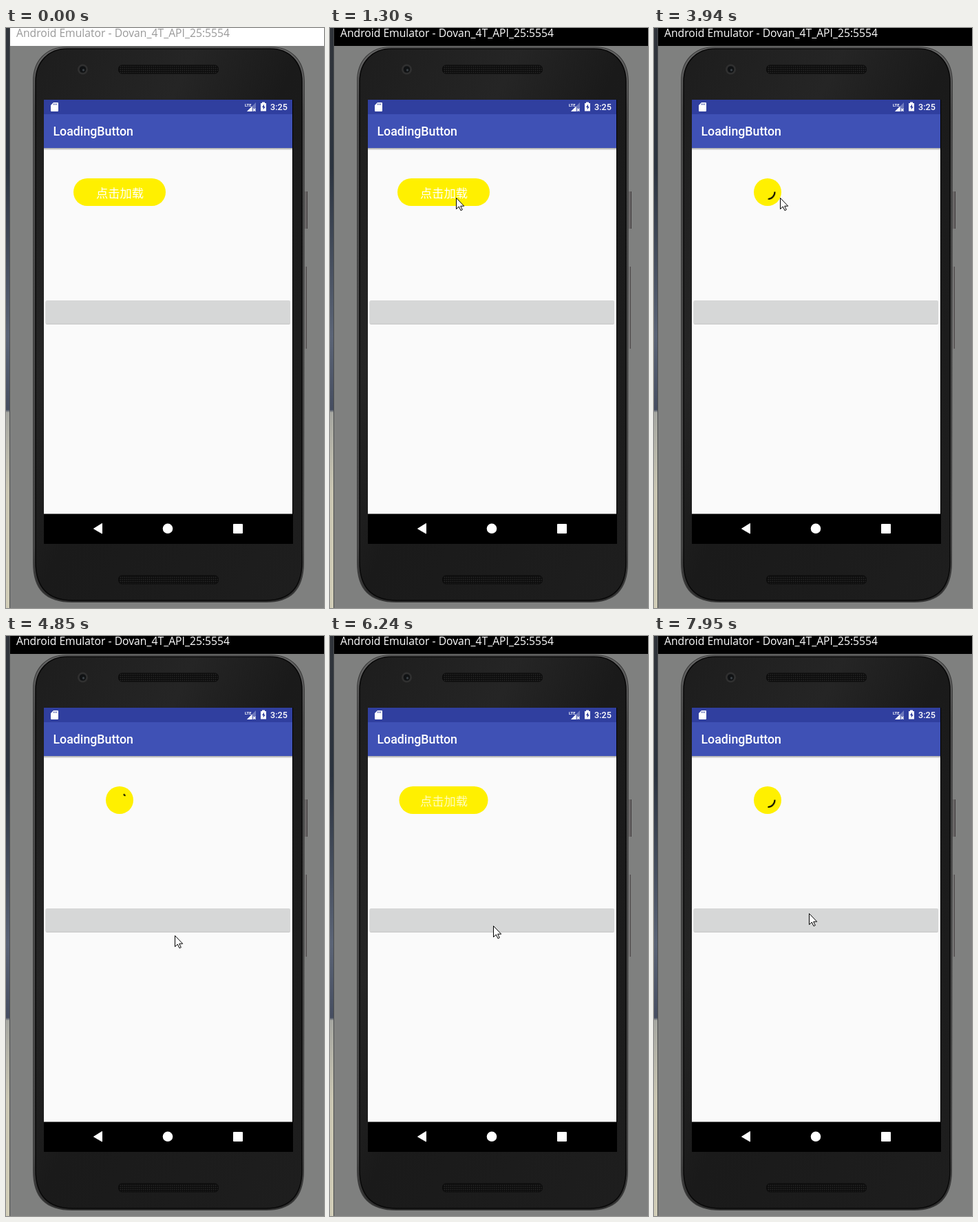
These frames come from a looping animation (462 by 841 pixels, 8 s). An HTML page:

```html
<!DOCTYPE html>
<html lang="en">
<head>
<meta charset="utf-8">
<title>Loading button</title>
<style>
@property --head { syntax: "<number>"; inherits: false; initial-value: 0; }
@property --tail { syntax: "<number>"; inherits: false; initial-value: 0; }

html, body { margin: 0; width: 100%; height: 100%; overflow: hidden; background: #7f807f; }
svg { display: block; width: 100%; height: 100%; }
.roboto { font-family: Roboto, sans-serif; font-weight: 500; fill: #fff; }

.titlebar, .caption, .pill, .label, .arc, .cursor, .pressed, .ripple {
  animation-duration: 8s;
  animation-iteration-count: infinite;
  animation-timing-function: linear;
}

.titlebar { animation-name: bar; animation-timing-function: step-end; }
@keyframes bar { 0% { fill: #fff; } 14.375%, 100% { fill: #000; } }

.caption { font: 15.7px "Open Sans", sans-serif; animation-name: caption; animation-timing-function: step-end; }
@keyframes caption { 0% { fill: #999; } 14.375%, 100% { fill: #fff; } }

.pill { animation-name: pill; animation-timing-function: cubic-bezier(.37, 0, .63, 1); }
@keyframes pill {
  0%, 17.5%, 79.5%, 89.125% { x: 98px; width: 134px; }
  27.5%, 69.5%, 99.125%, 100% { x: 145px; width: 40px; }
}

.label { font: 17.25px "Noto Sans CJK SC", "Noto Sans CJK", sans-serif; fill: #fff; animation-name: label; }
@keyframes label {
  0%, 17.5%, 79.5%, 89.125% { opacity: 1; }
  23.5%, 73.5%, 95.125%, 100% { opacity: 0; }
}

/* The head eases round evenly; the tail waits, then catches up. */
.arc {
  fill: none; stroke: #000; stroke-width: 2;
  stroke-dasharray: calc((var(--head) - var(--tail)) * 1px) 720px;
  transform: rotate(calc(var(--tail) * 1deg));
  transform-origin: 165.5px 238px;
  animation-name: arc, head, tail;
  animation-duration: 8s, 2s, 2s;
  animation-delay: 0s, -.72s, -.72s;
  animation-timing-function: step-end, cubic-bezier(.37, 0, .63, 1), linear;
}
@keyframes arc {
  0% { opacity: 0; } 22% { opacity: 1; }
  73% { opacity: 0; } 93.5%, 100% { opacity: 1; }
}
@keyframes head { from { --head: 0; } to { --head: 360; } }
@keyframes tail {
  0% { --tail: -16; }
  40% { --tail: 0; animation-timing-function: ease-in-out; }
  90% { --tail: 338; }
  100% { --tail: 344; }
}

.pressed { animation-name: pressed; }
@keyframes pressed {
  0%, 67.5% { opacity: 0; }
  70%, 73.5% { opacity: 1; }
  78%, 100% { opacity: 0; }
}
.ripple { animation-name: ripple; }
@keyframes ripple {
  0%, 67.5% { r: 10px; opacity: 0; }
  69% { r: 34px; opacity: .8; }
  71.125% { r: 59px; opacity: 1; }
  76%, 100% { r: 182px; opacity: 0; }
}

.cursor { animation-name: cursor; }
@keyframes cursor {
  0% { transform: translate(-60px, -60px); animation-timing-function: step-end; }
  .875% { transform: translate(367px, 771px); animation-timing-function: step-end; }
  1.75% { transform: translate(255px, 520px); animation-timing-function: step-end; }
  2.625% { transform: translate(147px, 283px); animation-timing-function: step-end; }
  5.625% { transform: translate(158px, 264px); animation-timing-function: step-end; }
  6.625%, 9.625% { transform: translate(170px, 247px); }
  11.625%, 53.75% { transform: translate(183px, 246px); }
  57.75% { transform: translate(247px, 439px); }
  60.625% { transform: translate(245px, 434px); }
  63.5%, 83% { transform: translate(237px, 420px); }
  87.75%, 92.5% { transform: translate(157px, 238px); }
  97.5%, 100% { transform: translate(225px, 402px); }
}
</style>
</head>
<body>
<svg viewBox="0 0 462 841" preserveAspectRatio="none">
  <defs>
    <linearGradient id="desk" x2="0" y2="1">
      <stop offset="0" stop-color="#30343a"/>
      <stop offset=".24" stop-color="#2b333f"/>
      <stop offset=".53" stop-color="#5b6476"/>
      <stop offset=".658" stop-color="#454d60"/>
      <stop offset=".663" stop-color="#a6a7a1"/>
      <stop offset=".8" stop-color="#cbc7b3"/>
      <stop offset="1" stop-color="#d2ceb8"/>
    </linearGradient>
    <linearGradient id="body" x2="1" y2="1">
      <stop offset="0" stop-color="#1d1d1d"/>
      <stop offset=".3" stop-color="#252525"/>
      <stop offset=".5" stop-color="#1a1a1a"/>
      <stop offset="1" stop-color="#1e1e1e"/>
    </linearGradient>
    <linearGradient id="rim" x2="0" y2="1">
      <stop offset="0" stop-color="#666"/>
      <stop offset=".12" stop-color="#4c4c4c"/>
      <stop offset=".9" stop-color="#484848"/>
      <stop offset="1" stop-color="#2a2a2a"/>
    </linearGradient>
    <linearGradient id="shade" x2="0" y2="1">
      <stop offset="0" stop-opacity=".34"/>
      <stop offset="1" stop-opacity="0"/>
    </linearGradient>
    <pattern id="mesh" width="3" height="3" patternUnits="userSpaceOnUse">
      <rect width="3" height="3" fill="#0e0e0e"/>
      <circle cx="1.5" cy="1.5" r=".8" fill="#2b2b2b"/>
    </pattern>
    <clipPath id="wide"><rect x="57.5" y="395" width="355.5" height="34" rx="2"/></clipPath>
  </defs>

  <rect width="462" height="841" fill="#7f807f"/>
  <rect width="5" height="841" fill="url(#desk)"/>
  <rect x="5" width="1" height="841" fill="#4a4c4d"/>
  <rect class="titlebar" x="6" width="456" height="26"/>
  <text class="caption" x="15" y="13">Android Emulator - Dovan_4T_API_25:5554</text>

  <!-- phone -->
  <rect x="434" y="237" width="3" height="54" fill="#6a6767"/>
  <rect x="437" y="237" width="1" height="54" fill="#3f3b3b"/>
  <rect x="434" y="346" width="2" height="119" fill="#777676"/>
  <rect x="436" y="346" width="1" height="119" fill="#4b4747"/>
  <path d="M88 27H385C415 27 434 47 434 77L433 775C433 816 413 833 378 833H96C58 833 39 815 39 775V77C39 47 58 27 88 27Z" fill="#3c3c3c"/>
  <path d="M88 28H385C414 28 433 48 433 77L432 775C432 815 412 832 378 832H96C59 832 40 814 40 775V77C40 48 59 28 88 28Z" fill="url(#rim)"/>
  <path d="M89 30H384C411 30 430 49 430 78V774C430 813 410 830 377 830H97C62 830 43 812 43 774V78C43 49 62 30 89 30Z" fill="url(#body)" stroke="#080808" stroke-width="1.5"/>
  <circle cx="111.5" cy="60" r="7.5" fill="#303030"/>
  <circle cx="111.5" cy="60" r="4.8" fill="#101214"/>
  <circle cx="112.5" cy="61" r="1.7" fill="#3b4146"/>
  <rect x="163.5" y="54" width="145" height="12" rx="5" fill="url(#mesh)" stroke="#0b0b0b"/>
  <rect x="163.5" y="794" width="145" height="12" rx="5" fill="url(#mesh)" stroke="#0b0b0b"/>

  <!-- screen -->
  <rect x="55" y="104" width="362" height="644"/>
  <rect x="55" y="174" width="361" height="530.500" fill="#fafafa"/>
  <rect x="55" y="174" width="361" height="3.500" fill="url(#shade)"/>
  <rect x="55" y="104" width="361" height="21" fill="#303f9f"/>
  <rect x="55" y="125" width="361" height="49" fill="#3f51b5"/>
  <g fill="#fff">
    <path d="M69 108H75Q76 108 76 109V120Q76 121 75 121H66Q65 121 65 120V112Z"/>
    <path d="M69.5 109.5v2M71.5 109.5v2M73.5 109.5v2" stroke="#303f9f"/>
    <path d="M363 108V121H350Z" opacity=".3"/>
    <path d="M357.5 113.5V121H350Z"/>
    <path d="M359 117l3.5 3.5M362.5 117l-3.5 3.5" stroke="#fff" stroke-width="1.2"/>
    <path d="M372 107.5h4v1.5h2v11.5h-8V109h2Z"/>
    <path d="M375 110.5l-3 4.5h1.7v3.5l3-4.5H375Z" fill="#303f9f"/>
    <path d="M127.500 726L139.500 718.5V733Z" stroke="#fff" stroke-linejoin="round"/>
    <circle cx="235" cy="725.800" r="7.300"/>
    <rect x="330" y="719" width="14" height="14" rx="1"/>
  </g>
  <text class="roboto" x="347" y="114" font-size="5.8" style="font-weight:700">LTE</text>
  <text class="roboto" x="384" y="119" font-size="12.6">3:25</text>
  <text class="roboto" x="68.5" y="156" font-size="17.75">LoadingButton</text>

  <!-- loading button -->
  <rect class="pill" x="98" y="218" width="134" height="40" rx="20" fill="#fff000"/>
  <text class="label" x="131" y="246">点击加载</text>
  <circle class="arc" cx="165.5" cy="238" r="10" pathLength="360"/>

  <!-- wide button -->
  <rect x="57.5" y="396" width="355.5" height="34" rx="2" opacity=".18"/>
  <rect x="57.5" y="395" width="355.5" height="33.5" rx="2" fill="#d6d7d7"/>
  <g clip-path="url(#wide)">
    <rect class="pressed" x="57" y="394" width="357" height="36" fill="#c9cbca"/>
    <circle class="ripple" cx="235.5" cy="414" r="10" fill="#c1c3c2"/>
  </g>

  <path class="cursor" d="M.5.5V16.5L4.3 13L7 18.6L9.3 17.5L6.7 12.2H11.7Z" fill="#fff" stroke="#000"/>
</svg>
</body>
</html>
```
